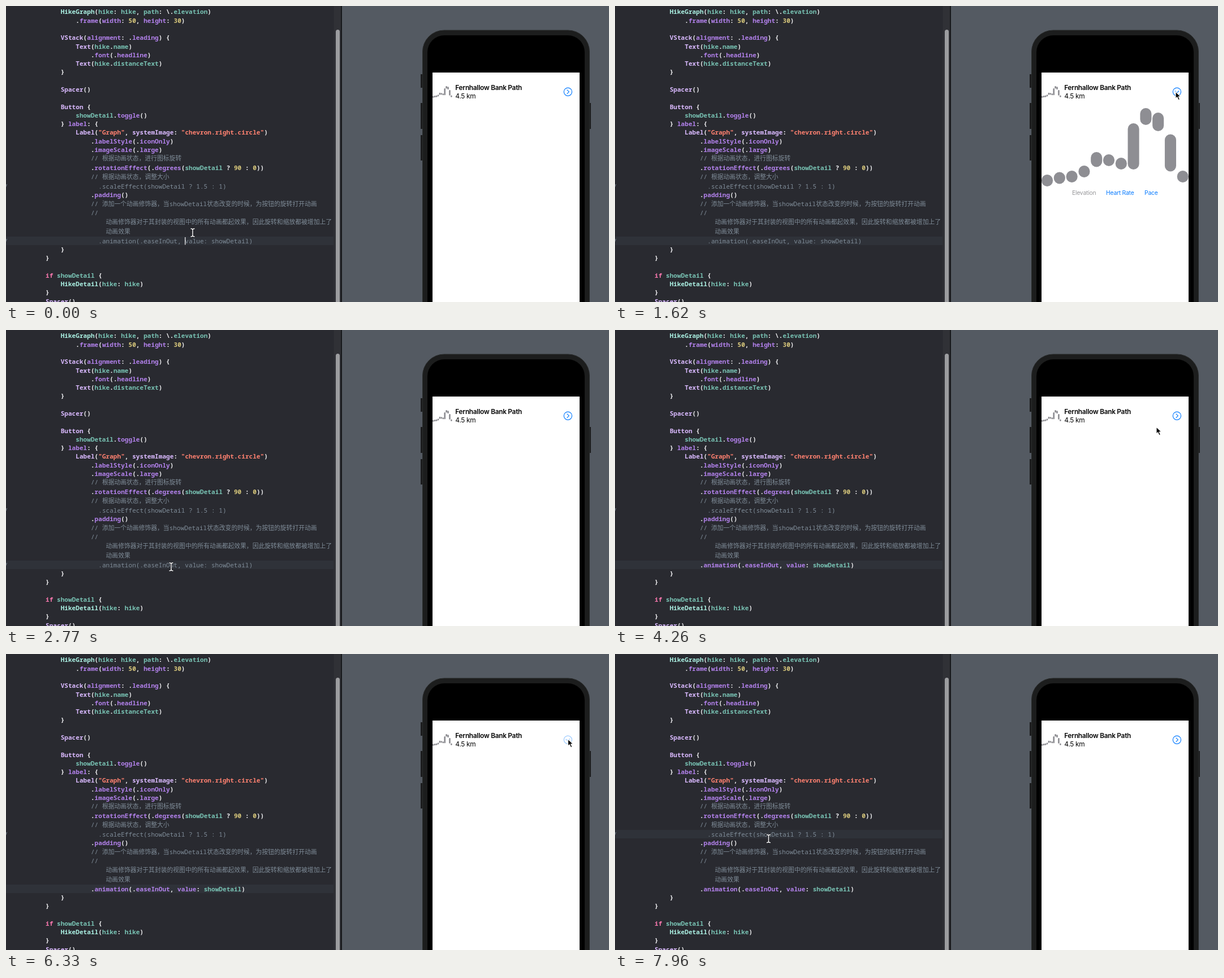
An HTML page that plays this animation: 1066x525 px, repeating every 8 s.

```html
<!DOCTYPE html>
<html lang="en">
<head>
<meta charset="utf-8">
<title>Hike view preview</title>
<style>
  html, body { margin: 0; width: 100%; height: 100%; overflow: hidden; background: #292a30; }
  svg { display: block; width: 1066px; height: 525px; }
  text { white-space: pre; }
  #code { font: 600 11.1px "Noto Sans Mono", "DejaVu Sans Mono", monospace; fill: #f2f2f4; }
  .note { font-weight: 500; fill: #7f8c98; }
  .han { font: 400 10.8px "Noto Sans CJK SC", "Noto Sans CJK", sans-serif; }
  .app { font: 400 11.8px Inter, "Liberation Sans", sans-serif; letter-spacing: -0.25px; }
  .title { font-weight: 600; }
  .tab { font-size: 10.4px; fill: #0a7cff; }
</style>
</head>
<body>
<svg viewBox="0 0 1066 525" xmlns="http://www.w3.org/2000/svg">
  <defs><path id="bar" d="M-3-7Q0-7 0-5V5Q0 7 3 7M3-7Q0-7 0-5M0 5Q0 7-3 7"/></defs>
  <rect width="1066" height="525" fill="#292a30"/>
  <rect id="current" width="579" height="15" fill="#2f3239"/>
  <g id="code"></g>
  <rect x="579.5" width="13.5" height="525" fill="#303136"/>
  <rect x="583" y="42" width="7" height="500" rx="3.5" fill="#9c9da0"/>
  <rect x="592" width="2.5" height="525" fill="#17181b"/>

  <rect x="594" width="472" height="525" fill="#545a62"/>
  <path d="M735 121V145M735 172V218M735 229V274M1032 172V218" stroke="#1b1c1d" stroke-width="4"/>
  <rect x="736.5" y="43" width="295" height="560" rx="38" fill="#1c1d1d" stroke="#292b2b"/>
  <rect x="745" y="52" width="278" height="560" rx="30"/>
  <rect x="754" y="118" width="260" height="407" fill="#fff"/>

  <g id="mini" fill="#8e8e93"></g>
  <text class="app title" x="794.3" y="149.2">Fernhallow Bank Path</text>
  <text class="app" x="794.3" y="163.6">4.5 km</text>
  <g id="icon" fill="none" stroke="#0a7cff" stroke-width="1.2" stroke-linecap="round" stroke-linejoin="round">
    <circle r="7.1"/>
    <path d="M-1.4-3.4 1.9 0-1.4 3.4"/>
  </g>
  <g id="detail">
    <g id="graph" fill="#8e8e93"></g>
    <text class="app tab" x="808" y="334.8" style="fill:#98989b">Elevation</text>
    <text class="app tab" x="868" y="334.8">Heart Rate</text>
    <text class="app tab" x="936" y="334.8">Pace</text>
  </g>

  <rect id="caret" width="1.2" height="13.5" fill="#fff"/>
  <g id="beam" fill="none" stroke-linecap="round">
    <use href="#bar" stroke="#202126" stroke-width="2.8"/>
    <use href="#bar" stroke="#fff" stroke-width="1.4"/>
  </g>
  <path id="arrow" d="M0 0V12.2L2.8 9.6 5 14.7 7.4 13.7 5.2 8.7H9Z" stroke="#fff" stroke-width="1.1"/>
</svg>
<script>
const el = id => document.getElementById(id);
const LOOP = 8000, STEP = 148;

// Syntax colours; any other identifier is purple.
const groups = {
  '#acf2e4': 'HikeGraph HikeDetail',
  '#dabaff': 'VStack Text Spacer Button Label systemImage',
  '#78c2b3': 'hike path elevation name distanceText showDetail',
  '#ff7ab2': 'if'
};
const wordColor = {};
for (const c in groups) groups[c].split(' ').forEach(w => wordColor[w] = c);

const paint = s => s.replace(/"[^"]*"|[A-Za-z]+|\d+/g, m => {
  const fill = m[0] === '"' ? '#ff8170' : /\d/.test(m) ? '#d9c97c' : wordColor[m] || '#b281eb';
  return `<tspan fill="${fill}">${m}</tspan>`;
});
const HAN = /[\u3000-\u9fff\uff00-\uffef]+/g;
const note = s => s.replace(HAN, m => `<tspan class="han">${m}</tspan>`);
const line = (column, y, body, cls = '') =>
  `<text class="${cls}" x="${70 + column * 6.66}" y="${y}">${body}</text>`;
const disabledLine = (column, y, s) =>
  line(-12, y, '//', 'note') + line(column + 2, y, s, 'note');

// A leading # marks code that is commented out at the margin, ? code that gets enabled.
const source = String.raw`    HikeGraph(hike: hike, path: \.elevation)
        .frame(width: 50, height: 30)

    VStack(alignment: .leading) {
        Text(hike.name)
            .font(.headline)
        Text(hike.distanceText)
    }

    Spacer()

    Button {
        showDetail.toggle()
    } label: {
        Label("Graph", systemImage: "chevron.right.circle")
            .labelStyle(.iconOnly)
            .imageScale(.large)
            // 根据动画状态，进行图标旋转
            .rotationEffect(.degrees(showDetail ? 90 : 0))
            // 根据动画状态，调整大小
            #.scaleEffect(showDetail ? 1.5 : 1)
            .padding()
            // 添加一个动画修饰器，当showDetail状态改变的时候，为按钮的旋转打开动画
            //
                动画修饰器对于其封装的视图中的所有动画都起效果，因此旋转和缩放都被增加上了
                动画效果
            ?.animation(.easeInOut, value: showDetail)
    }
}

if showDetail {
    HikeDetail(hike: hike)
}
Spacer()`;

function listing() {
  let y = -0.8, afterHan = false;
  return source.split('\n').map(raw => {
    const s = raw.trim(), column = raw.search(/\S/), han = s.search(HAN) >= 0;
    y += afterHan ? 16.9 : han ? 15.5 : 15.28;
    afterHan = han;
    if (s[0] === '#') return disabledLine(column, y, s.slice(1));
    if (s[0] === '?') return `<g id="disabled">${disabledLine(column, y, s.slice(1))}</g>` +
      `<g id="enabled">${line(column, y, paint(s.slice(1)))}</g>`;
    return han || s === '//' ? line(column, y, note(s), 'note') : line(column, y, paint(s));
  }).join('');
}
el('code').innerHTML = listing();

// Top of each capsule, and the heights that differ from the usual one.
const tops = [299, 294.5, 292, 283, 259, 263, 269, 208, 181, 189, 227.5, 292];
const tall = { 4: 26.5, 7: 82, 8: 30, 9: 33, 10: 66 };
function capsules(top, width, height) {
  const pitch = width / 11.93, w = pitch * 0.92, k = height / 139;
  return tops.map((y, i) => {
    const h = (tall[i] || 21) * k;
    return `<rect x="${754 + i * pitch}" y="${top + (y - 181) * k}" width="${w}" height="${h}" rx="${w / 2}" ry="${Math.min(w, h) / 2}"/>`;
  }).join('');
}
el('graph').innerHTML = capsules(181, 260, 139);
el('mini').innerHTML = capsules(142, 34.7, 20.8);

// Pointer moves: start time, then one place per step.
const moves = [
  [-STEP, '330,402'],
  [140, '372,392 530,336 745,255 905,190 990,154 1021,143 1004,160 995,171 993,158 992,153 991,152'],
  [2035, '984,159 890,215 640,325 410,397 292,420 271.5,422'],
  [3960, '320,404 680,272 957,172 985,156 990,151 991.5,150'],
  [4990, '993.5,151'],
  [6475, '990,156 900,215 610,330 310,405 205,411 192.5,335 271.5,327.5']
];
function pointer(t) {
  const [start, path] = moves.filter(m => m[0] <= t).pop();
  const places = path.split(' ');
  const i = Math.min(places.length - 1, Math.floor((t - start) / STEP));
  return places[i].split(',').map(Number);
}

// Button presses: time, angle before, angle after, rotation delay, rotation length.
const presses = [[1170, 0, 90, 0, 1], [1890, 90, 0, 0, 1], [5290, 0, 90, 0, 300], [6180, 90, 0, 100, 300]];
const clamp = v => Math.max(0, Math.min(1, v));
const smooth = p => p * p * (3 - 2 * p);
function icon(t) {
  const press = presses.filter(p => p[0] <= t).pop();
  if (!press) return { opacity: 1, angle: 0 };
  const [at, from, to, delay, length] = press;
  const age = Math.floor((t - at) / STEP) * STEP;
  const turn = length === 1 ? 1 : smooth(clamp((age - delay) / length));
  return { opacity: 0.25 + 0.75 * clamp(age / 440) ** 1.5, angle: from + (to - from) * turn };
}

// Caret: from, until, x, y.
const carets = [[0, 140, 316.2, 410], [3370, 3960, 257, 410], [7370, 7960, 270, 313]];
const within = (t, a, b) => t >= a && t < b;
const show = (id, on) => el(id).setAttribute('visibility', on ? 'visible' : 'hidden');
const place = (id, x, y, angle = 0) =>
  el(id).setAttribute('transform', `translate(${x} ${y}) rotate(${angle})`);

function draw(t) {
  const [x, y] = pointer(t);
  place('beam', x, y);
  place('arrow', x, y);
  show('beam', x < 580);
  show('arrow', x >= 580);

  const { opacity, angle } = icon(t);
  place('icon', 993.4, 152.2, angle);
  el('icon').setAttribute('opacity', opacity);
  show('detail', within(t, 1170, 1890) || within(t, 5290, 6330));

  show('enabled', t >= 3370);
  show('disabled', t < 3370);
  el('current').setAttribute('y', t < 7370 ? 409 : 312);

  const caret = carets.find(c => within(t, c[0], c[1]));
  show('caret', caret);
  if (caret) place('caret', caret[2], caret[3]);
}

const start = performance.now();
function tick() {
  draw((performance.now() - start) % LOOP);
  requestAnimationFrame(tick);
}
tick();
</script>
</body>
</html>
```
